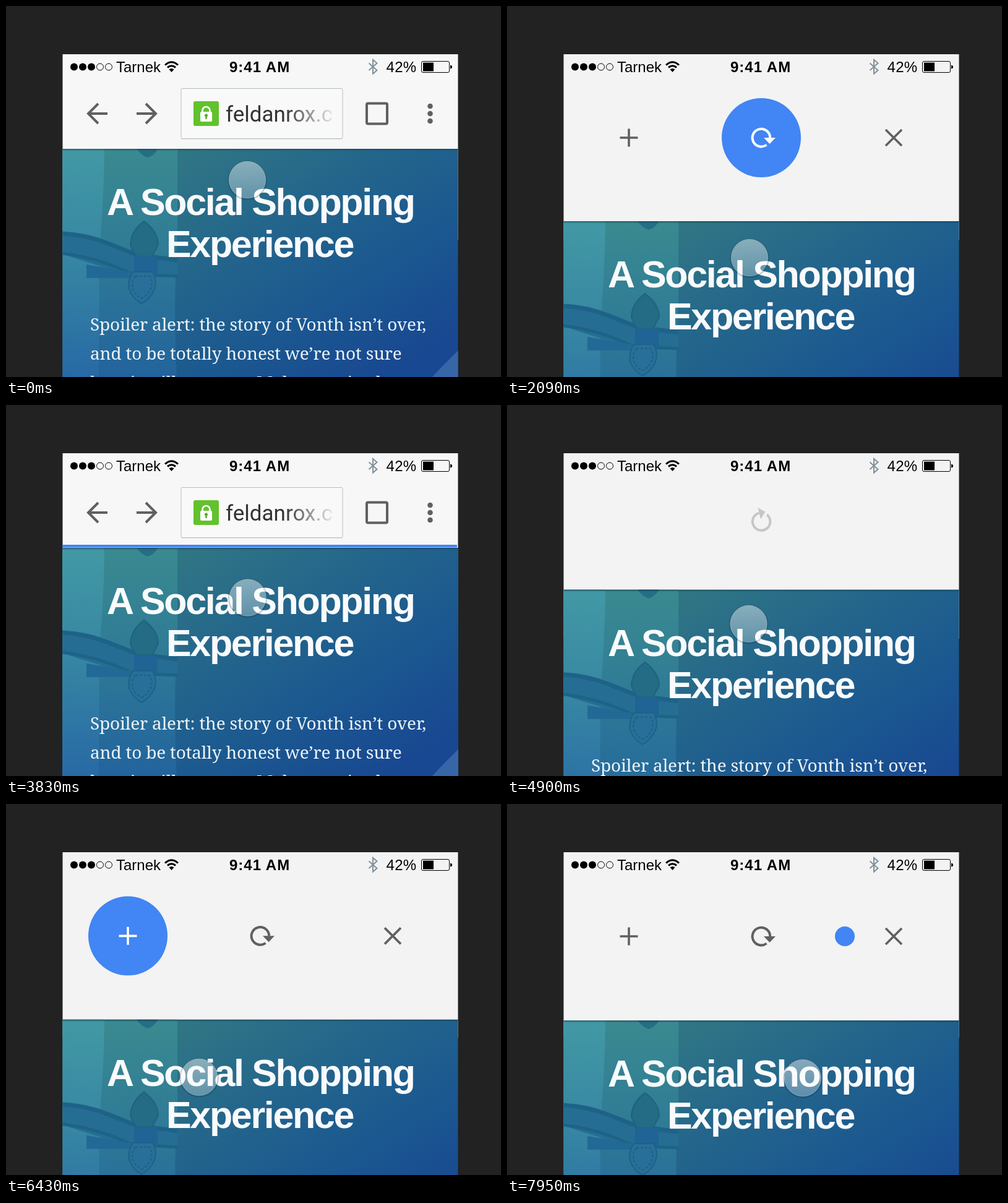
An HTML page that plays this animation: 800x600 px, repeating every 8 s.

```html
<!DOCTYPE html>
<html lang="en">
<head>
<meta charset="utf-8">
<title>Pull to refresh</title>
<style>
html, body { margin: 0; width: 100%; height: 100%; overflow: hidden; background: #222; }
svg { display: block; width: 100%; height: 100%; }
.sans { font-family: "Liberation Sans", Arial, sans-serif; }
.title { font-size: 61px; font-weight: bold; letter-spacing: -2.35px; fill: #f9fafb; }
.body { font-family: "Noto Serif", serif; font-size: 28px; letter-spacing: -.2px; fill: #eef4f8; }
.status { font-size: 24px; }
.line { fill: none; stroke: #5f6062; stroke-width: 4; }
.glyph { fill: none; stroke: currentColor; }
</style>
</head>
<body>
<svg viewBox="0 0 800 600">
  <defs>
    <clipPath id="phone"><rect x="91.5" y="78" width="639" height="522"/></clipPath>
    <clipPath id="headClip"><rect id="headBox" x="91" y="78" width="640" height="153"/></clipPath>
    <clipPath id="dotClip"><circle id="dotHole"/></clipPath>
    <linearGradient id="sky" gradientUnits="userSpaceOnUse" x1="300" y1="-10" x2="560" y2="400">
      <stop offset="0" stop-color="#307784"/><stop offset=".35" stop-color="#24668b"/>
      <stop offset=".68" stop-color="#1b5890"/><stop offset="1" stop-color="#184891"/>
    </linearGradient>
    <linearGradient id="edge" x1="0" y1="0" x2="0" y2="1">
      <stop offset="0" stop-color="#4299a4"/><stop offset=".45" stop-color="#3787a3"/>
      <stop offset="1" stop-color="#2769a5"/>
    </linearGradient>
    <linearGradient id="flap" x1="0" y1="0" x2="0" y2="1">
      <stop offset="0" stop-color="#3a8a90"/><stop offset=".45" stop-color="#2f7b96"/>
      <stop offset="1" stop-color="#22639d"/>
    </linearGradient>
    <linearGradient id="urlFade" gradientUnits="userSpaceOnUse" x1="450" y1="0" x2="528" y2="0">
      <stop offset="0" stop-color="#333"/><stop offset="1" stop-color="#333" stop-opacity=".08"/>
    </linearGradient>
    <linearGradient id="touchFill" x1="0" y1="0" x2="0" y2="1">
      <stop offset="0" stop-color="#fff" stop-opacity=".44"/>
      <stop offset="1" stop-color="#fff" stop-opacity=".27"/>
    </linearGradient>
    <g id="plus" class="glyph" stroke-width="3.6"><path d="M-14.5 0H14.5M0-14.5V14.5"/></g>
    <g id="cross" class="glyph" stroke-width="3.6"><path d="M-13-13L13 13M-13 13L13-13"/></g>
    <g id="reload">
      <path class="glyph" stroke-width="4" d="M8.5 11.5A14.3 14.3 0 1 1 14.2 0"/>
      <path fill="currentColor" d="M4 0H23L13.5 10Z"/>
    </g>
    <g id="icons">
      <use href="#plus" x="197" class="side"/>
      <use href="#cross" x="625" class="side"/>
      <g transform="translate(411 0)"><use href="#reload" class="spin"/></g>
    </g>
  </defs>

  <rect width="800" height="600" fill="#222"/>
  <g clip-path="url(#phone)">
    <rect id="head" x="91" y="78" width="640" height="300"/>

    <g id="bar">
      <path class="line" d="M164 174H134M149 158L133 174L149 190"/>
      <path class="line" d="M211 174H241M226 158L242 174L226 190"/>
      <rect x="283" y="134.5" width="261" height="81" rx="2" fill="#000" opacity=".12"/>
      <rect x="283" y="133.5" width="261" height="81" rx="2" fill="#f9f9f9" stroke="#b3bec5"/>
      <rect x="303" y="154" width="41" height="40" rx="3" fill="#62c22d"/>
      <path d="M317.5 172V169A6 6 0 0 1 329.5 169V172" fill="none" stroke="#fff" stroke-width="2.6"/>
      <rect x="314" y="171" width="19" height="16" rx="2" fill="#fff"/>
      <path d="M323.5 176V183" stroke="#55ac27" stroke-width="2.5"/>
      <circle cx="323.5" cy="177" r="2.5" fill="#55ac27"/>
      <text x="355" y="187" font-family="Roboto, sans-serif" font-size="35" fill="url(#urlFade)">feldanrox.c</text>
      <rect class="line" x="583" y="157.5" width="33" height="33" rx="2"/>
      <g fill="#5f6062"><circle cx="685.5" cy="162" r="4.3"/><circle cx="685.5" cy="174" r="4.3"/><circle cx="685.5" cy="186" r="4.3"/></g>
    </g>

    <g clip-path="url(#headClip)">
      <g id="dark" color="#5f6062"><use href="#icons"/></g>
      <circle id="dot" fill="#4285f4"/>
      <g clip-path="url(#dotClip)"><g id="light" color="#fff"><use href="#icons"/></g></g>
      <rect id="flood" x="91" y="78" width="640" height="300" fill="#4285f4"/>
    </g>

    <g id="page">
      <rect x="91" width="640" height="380" fill="url(#sky)"/>
      <path d="M91 0H277V130Q270 250 276 372H91Z" fill="url(#flap)"/>
      <path d="M91 0H159Q158 90 151 160L150 372H91Z" fill="url(#edge)"/>
      <path d="M211 0H246Q238 12 229 14Q219 11 211 0Z" fill="#256e83"/>
      <path d="M91 134Q130 136 165 150T214 169L277 177V208L205 204Q150 190 91 170Z" fill="#256d93"/>
      <path d="M91 137Q130 139 165 153T214 172L277 180" fill="none" stroke="#1e6387" stroke-width="7"/>
      <path d="M91 169Q150 176 205 203L277 206" fill="none" stroke="#1e6387" stroke-width="5"/>
      <path d="M130 187L205 200V209H130Z" fill="#226a95"/>
      <path d="M223 117Q246 134 246 155Q242 163 236 174H211Q204 165 201 155Q202 132 223 117Z" fill="#246b85" stroke="#1f6280" stroke-width="2"/>
      <path d="M207 174H245V205H207Z" fill="#1f6495"/>
      <path d="M205 199H237Q245 214 240 227Q233 243 219 250Q205 243 199 227Q196 213 205 199Z" fill="#286f99" stroke="#1f6186" stroke-width="2"/>
      <path d="M209 206H232Q238 216 234 226Q229 237 219 242Q209 237 205 226Q202 215 209 206Z" fill="none" stroke="#1f5f84" stroke-width="2" stroke-dasharray="4 3"/>
      <path d="M731 326Q708 348 686 372H731Z" fill="#3766a8"/>
      <rect x="91" width="640" height="1.5" fill="#123d55" opacity=".65"/>
      <rect x="91" y="1.5" width="640" height="2" fill="#123d55" opacity=".15"/>
      <g class="sans title">
        <text x="163" y="107">A Social Shopping</text>
        <text x="259" y="175">Experience</text>
      </g>
      <g class="body">
        <text x="136" y="294">Spoiler alert: the story of Vonth isn’t over,</text>
        <text x="136" y="341">and to be totally honest we’re not sure</text>
        <text x="136" y="388">how it will turn out. Make no mistake:</text>
      </g>
    </g>
    <rect id="load" x="91" y="226" height="4.5" fill="#4285f4"/>

    <g class="sans status">
      <circle cx="110" cy="98.5" r="6"/><circle cx="124" cy="98.5" r="6"/><circle cx="138" cy="98.5" r="6"/>
      <g fill="none" stroke="#000"><circle cx="152" cy="98.5" r="5.5"/><circle cx="166" cy="98.5" r="5.5"/></g>
      <text x="178" y="107">Tarnek</text>
      <path d="M257 95.5Q267.5 86 278 95.5M261 99.5Q267.5 94 274 99.5" fill="none" stroke="#000" stroke-width="3"/>
      <path d="M263.5 102.5Q267.5 99.5 271.5 102.5L267.5 107Z"/>
      <text x="361" y="107" font-weight="bold" letter-spacing="1">9:41 AM</text>
      <path d="M586.5 92.5L599.5 104L593 109.5V87L599.5 92.5L586.5 104" fill="none" stroke="#80919c" stroke-width="2"/>
      <text x="614.5" y="107" letter-spacing=".3">42%</text>
      <rect x="671.5" y="89.5" width="45" height="18" rx="2.5" fill="none" stroke="#000"/>
      <rect x="674" y="91.5" width="17" height="14"/>
      <path d="M718 95.5Q721 96 721 98.5T718 101.5Z"/>
    </g>

    <g id="touch">
      <circle cy="1" r="30.5" fill="none" stroke="#0b2b40" stroke-opacity=".22" stroke-width="2.5"/>
      <circle r="30" fill="url(#touchFill)"/>
      <circle r="29.5" fill="none" stroke="#fff" stroke-opacity=".2"/>
    </g>
  </g>
</svg>
<script>
const LOOP = 8000, REST = 231, FULL = 117;
const $ = id => document.getElementById(id);
const set = (el, attrs) => { for (const k in attrs) el.setAttribute(k, attrs[k]); };
const setAll = (sel, attrs) => document.querySelectorAll(sel).forEach(el => set(el, attrs));
const clamp = x => Math.min(1, Math.max(0, x));
const span = (t, a, b) => clamp((t - a) / (b - a));

const linear = x => x;
const sine = x => (1 - Math.cos(Math.PI * x)) / 2;
const quad = x => x < .5 ? 2 * x * x : 1 - 2 * (1 - x) ** 2;
const cubic = x => x < .5 ? 4 * x ** 3 : 1 - 4 * (1 - x) ** 3;

// Value at time t along [time, value] pairs
function track(t, keys, ease = sine) {
  let [t0, v0] = keys[0];
  for (const [t1, v1] of keys) {
    if (t < t1) return v0 + (v1 - v0) * ease(span(t, t0, t1));
    t0 = t1; v0 = v1;
  }
  return v0;
}

const touchX = [[0, 390], [1100, 390], [1700, 392], [3400, 392], [4100, 390], [4550, 390], [5250, 391],
  [5500, 391], [5800, 375], [6250, 318], [6450, 312], [7080, 370], [7950, 478], [8100, 494]];
const dotX = [[5480, 411], [5800, 401], [5880, 394], [6240, 197], [6840, 197], [7190, 411], [7740, 411], [8110, 625]];
const dotR = [[1600, 0], [1800, 64], [2150, 64], [2400, 385], [2401, 0], [5170, 0], [5370, 64],
  [5860, 64], [6030, 12], [6120, 12], [6290, 64], [6820, 64], [6960, 12], [7080, 12], [7250, 64],
  [7740, 64], [7990, 13]];

function touchY(t) {
  if (t < 3430) return 281 + 126 * sine(span(t, 1100, 1660));
  if (t < 4550) return 407 - 126 * cubic(span(t, 3430, 4090));
  return track(t, [[4550, 281], [5300, 443], [5900, 443], [7080, 440], [7950, 443]]);
}

const isClosing = t => t >= 2400 && t < 4550;

function pullAt(t, y) {
  if (isClosing(t)) return FULL * (1 - quad(span(t, 2400, 2753)));
  const limit = FULL + Math.max(0, t - 5600) / 1150;
  return Math.min((y - 281) * .93, limit);
}

function draw(t) {
  const x = track(t, touchX), y = touchY(t);
  const pull = pullAt(t, y), top = REST + pull;
  const closing = isClosing(t);

  set($('touch'), { transform: `translate(${x} ${y})` });
  set($('page'), { transform: `translate(0 ${top})` });
  set($('headBox'), { height: top - 78 });
  const grey = 247 - 4 * span(pull, 0, 60);
  set($('head'), { fill: `rgb(${grey},${grey},${grey})` });
  set($('bar'), { transform: `translate(0 ${pull / 8})`, opacity: 1 - span(pull, 12, 62) });

  const iconY = 213 + (pull - FULL) / 2;
  const shown = closing ? 0 : 1;
  for (const id of ['dark', 'light']) set($(id), { transform: `translate(0 ${iconY})`, opacity: shown });
  setAll('.spin', { transform: `rotate(${-224 * (1 - span(pull, 11, FULL))})`, opacity: span(pull, 47, FULL) });
  setAll('.side', { opacity: span(pull, 68, FULL) });

  const dot = { cx: track(t, dotX, quad), cy: iconY, r: track(t, dotR) };
  set($('dot'), dot);
  set($('dotHole'), dot);
  set($('flood'), { opacity: closing ? 1 - span(t, 2560, 2840) : 0 });

  set($('load'), {
    width: 638 * track(t, [[2760, 0], [3200, .5], [3830, 1]], linear),
    y: top - 5,
    opacity: t < 2760 ? 0 : 1 - span(t, 3880, 4110)
  });
}

const start = performance.now();
function tick() {
  draw((performance.now() - start) % LOOP);
  requestAnimationFrame(tick);
}
draw(0);
tick();
</script>
</body>
</html>
```
